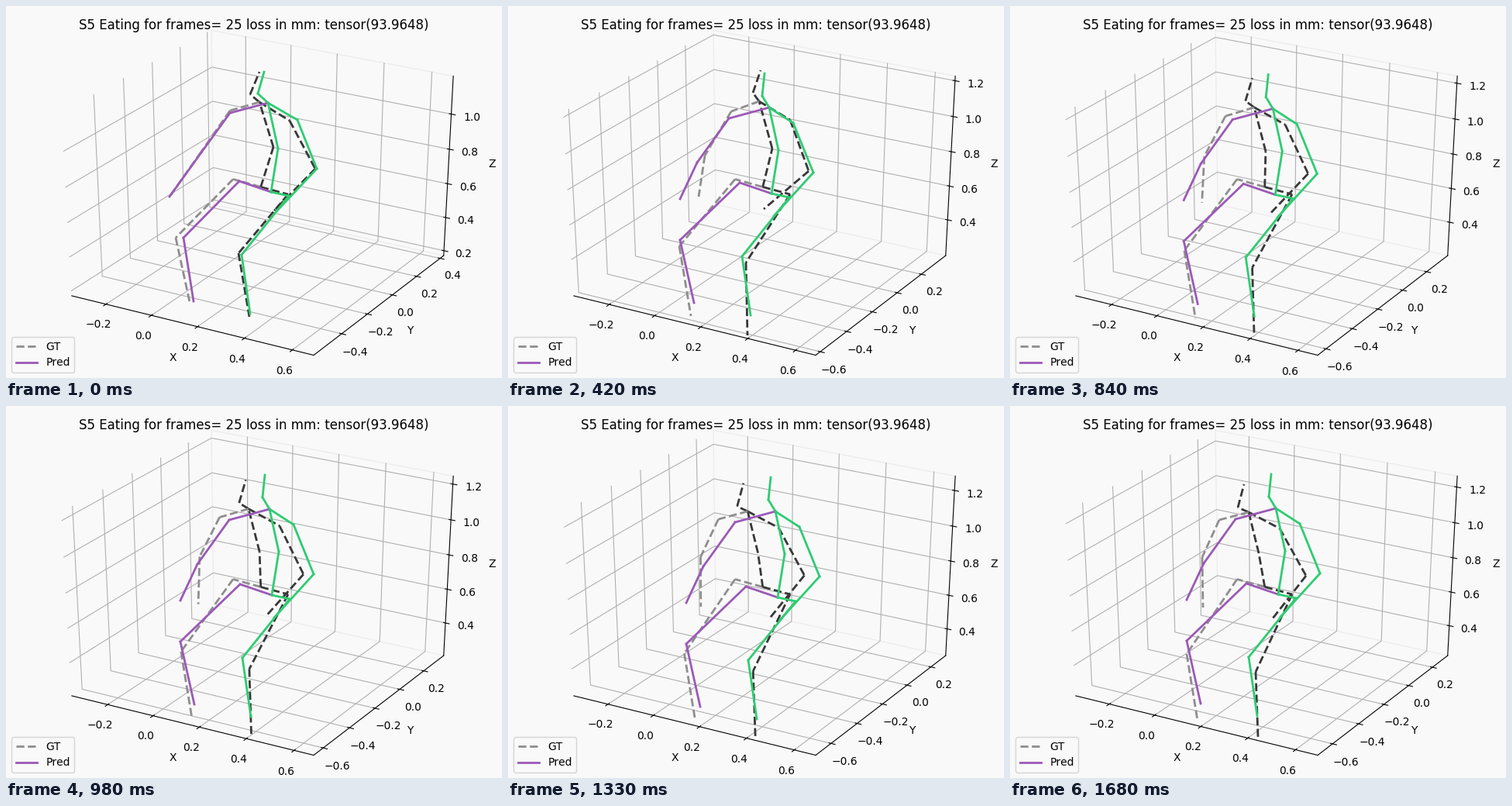
A matplotlib script that plays this animation: 640x480 px, repeating every 1.75 s.

```python
import numpy as np
import matplotlib.pyplot as plt
from matplotlib.animation import FuncAnimation

W, H, FRAMES, STEP_MS = 640, 480, 25, 70
BG, GRID, PANE_EDGE = "#f9f9f9", "#b0b0b0", "#ededed"
TRUTH_COLORS = ("#8e8e8e", "#383838")
GUESS_COLORS = ("#9b59b6", "#2ecc71")

# Perspective camera around a unit cube centred on the pelvis
ELEV, AZIM, DIST = np.radians(30), np.radians(-60), 10
EYE = np.array([np.cos(ELEV) * np.cos(AZIM), np.cos(ELEV) * np.sin(AZIM), np.sin(ELEV)])
RIGHT = np.array([-np.sin(AZIM), np.cos(AZIM), 0])
UP = np.cross(EYE, RIGHT)
EDGE = 0.5 + 1 / 48
DELTA = 1 / 12
POINT = 48 / (72 * (6.4 + 4.8)) * DELTA
TICK_PAD, LABEL_PAD = 11.5 * POINT, 25 * POINT

# World position of the true pelvis and screen position of the predicted one
KEYS = [0, 6, 14, 19, 24]
ROOT = [(.1675, -.09, .691), (.162, -.113, .705), (.16, -.15, .7235),
        (.1675, -.194, .759), (.1705, -.19, .74)]
DRIFT = [(342, 240), (340, 242), (343, 244), (348, 247), (346, 243)]

# Each joint: its start, then where it swings to, then where it settles
SWING = 6
TRUTH_PELVIS = (328.7, 233.5)
TRUTH = dict(
    leg_l=[[(293, 223.5)],
           [(219, 299), (221, 310), (228, 320)],
           [(237, 382), (236, 400), (242, 406)]],
    leg_r=[[(364, 243)],
           [(300, 319), (307, 331), (317, 343)],
           [(314, 401), (309, 425), (320, 427)]],
    spine=[[(345, 182), (341, 184), (321, 190)],
           [(327, 124), (324, 123), (308, 137)],
           [(315, 114), (316, 112), (294, 131)],
           [(327, 85), (326, 83), (302, 101)]],
    arm_l=[[(289, 135), (288, 136), (270, 147)],
           [(252, 188), (254, 193), (248, 195)],
           [(211, 246), (246, 246), (249, 260)]],
    arm_r=[[(366, 148), (364, 147), (348, 158)],
           [(399, 210), (388, 213), (382, 219)],
           [(346, 264), (330, 262), (339, 274)]],
)
# The predicted joints are relative to its pelvis
GUESS = dict(
    leg_l=[[(-41, -14)], [(-113, 59), (-118, 60)], [(-100, 141)]],
    leg_r=[[(23, 5)], [(-38, 81)], [(-27, 157)]],
    spine=[[(9, -56)], [(-4, -115), (-3, -111)], [(-17, -127), (-12, -126)], [(-9, -155)]],
    arm_l=[[(-53, -102), (-55, -97)], [(-90, -51), (-96, -40)], [(-131, 6), (-118, 7)]],
    arm_r=[[(34, -93), (28, -91)], [(59, -30), (54, -27)], [(8, 24), (3, 29)]],
)


def follow(path, t):
    return np.array([np.interp(t, KEYS, column) for column in zip(*path)])


def swing(points, t):
    """Go evenly to the second point, then ease out to the third."""
    start, middle, end = np.array((points + points[-1:] * 2)[:3], float)
    u = min(t / SWING, 1)
    v = 1 - (1 - max(t - SWING, 0) / (FRAMES - 1 - SWING)) ** 2
    return start + (middle - start) * u + (end - middle) * v


def project(*p):
    p = np.array(p)
    scale = 1 / 0.185 / (DIST - p @ EYE)
    return (0.095 / 0.185 + p @ RIGHT * scale) * W, H - (0.095 / 0.185 + p @ UP * scale) * H


def line3d(points, color="black", lw=0.8):
    xs, ys = zip(*(project(*p) for p in points))
    ax.plot(xs, ys, color=color, lw=lw)


def label3d(point, text, va):
    ax.text(*project(*point), text, size=10, ha="center", va=va)


def draw_box(root):
    e, far, name = EDGE, EDGE + TICK_PAD, EDGE + LABEL_PAD
    t_in, t_out = e - 0.1 * DELTA, e + 0.2 * DELTA
    for back in ([(-e, e, e), (e, e, e)], [(-e, e, -e), (e, e, -e)],
                 [(-e, e, -e), (-e, e, e)]):
        line3d(back, PANE_EDGE, 1)

    # Per axis: grid path, tick ends, tick label, edge line, axis name
    axes = [
        (lambda v: [(v, -e, -e), (v, e, -e), (v, e, e)],
         lambda v: [(v, -t_in, -e), (v, -t_out, -e)],
         lambda v: (v, -far, -far),
         [(-e, -e, -e), (e, -e, -e)], (0, -name, -name)),
        (lambda v: [(e, v, -e), (-e, v, -e), (-e, v, e)],
         lambda v: [(t_in, v, -e), (t_out, v, -e)],
         lambda v: (far, v, -far),
         [(e, -e, -e), (e, e, -e)], (name, 0, -name)),
        (lambda v: [(-e, -e, v), (-e, e, v), (e, e, v)],
         lambda v: [(t_in, e, v), (t_out, e, v)],
         lambda v: (far, far, v),
         [(e, e, -e), (e, e, e)], (name, name, 0)),
    ]
    for centre, letter, (grid, tick, spot, edge, title) in zip(root, "XYZ", axes):
        values = [k / 5 for k in range(-10, 11) if abs(k / 5 - centre) <= 0.5]
        for value in values:
            line3d(grid(value - centre), GRID)
        line3d(edge)
        for value in values:
            line3d(tick(value - centre))
            label3d(spot(value - centre), f"{value:.1f}".replace("-", "\u2212"), "top")
        label3d(title, letter, "center")


def draw_body(limbs, pelvis, origin, t, colors, style):
    joints = {name: [swing(points, t) + origin for points in limb]
              for name, limb in limbs.items()}
    thorax = joints["spine"][1]
    left, right = colors
    for name, chain in joints.items():
        chain = [thorax if name.startswith("arm") else pelvis] + chain
        color = left if name.endswith("_l") else right
        for (x0, y0), (x1, y1) in zip(chain, chain[1:]):
            ax.plot([x0, x1], [y0, y1], style, color=color, lw=2)


def draw(i):
    ax.cla()
    ax.set(xlim=(0, W), ylim=(H, 0))
    ax.axis("off")
    draw_box(follow(ROOT, i))

    draw_body(TRUTH, TRUTH_PELVIS, 0, i, TRUTH_COLORS, "--")
    pelvis = follow(DRIFT, i)
    draw_body(GUESS, pelvis, pelvis, i, GUESS_COLORS, "-")

    ax.text(W / 2, 30.07, "S5 Eating for frames= 25 loss in mm: tensor(93.9648)",
            size=12, ha="center", va="baseline")
    handles = [ax.plot([], [], style, color=colors[0], lw=2, label=label)[0]
               for style, colors, label in (("--", TRUTH_COLORS, "GT"),
                                            ("-", GUESS_COLORS, "Pred"))]
    ax.legend(handles=handles, loc="lower left", fontsize=10, facecolor=BG)
    return []


plt.rcParams["font.family"] = "DejaVu Sans"
plt.rcParams["text.kerning_factor"] = 6
fig = plt.figure(figsize=(W / 100, H / 100), dpi=100, facecolor=BG)
ax = fig.add_axes([0, 0, 1, 1])
anim = FuncAnimation(fig, draw, frames=FRAMES, init_func=lambda: [],
                     interval=STEP_MS, repeat=True, repeat_delay=0)
plt.show()
```
